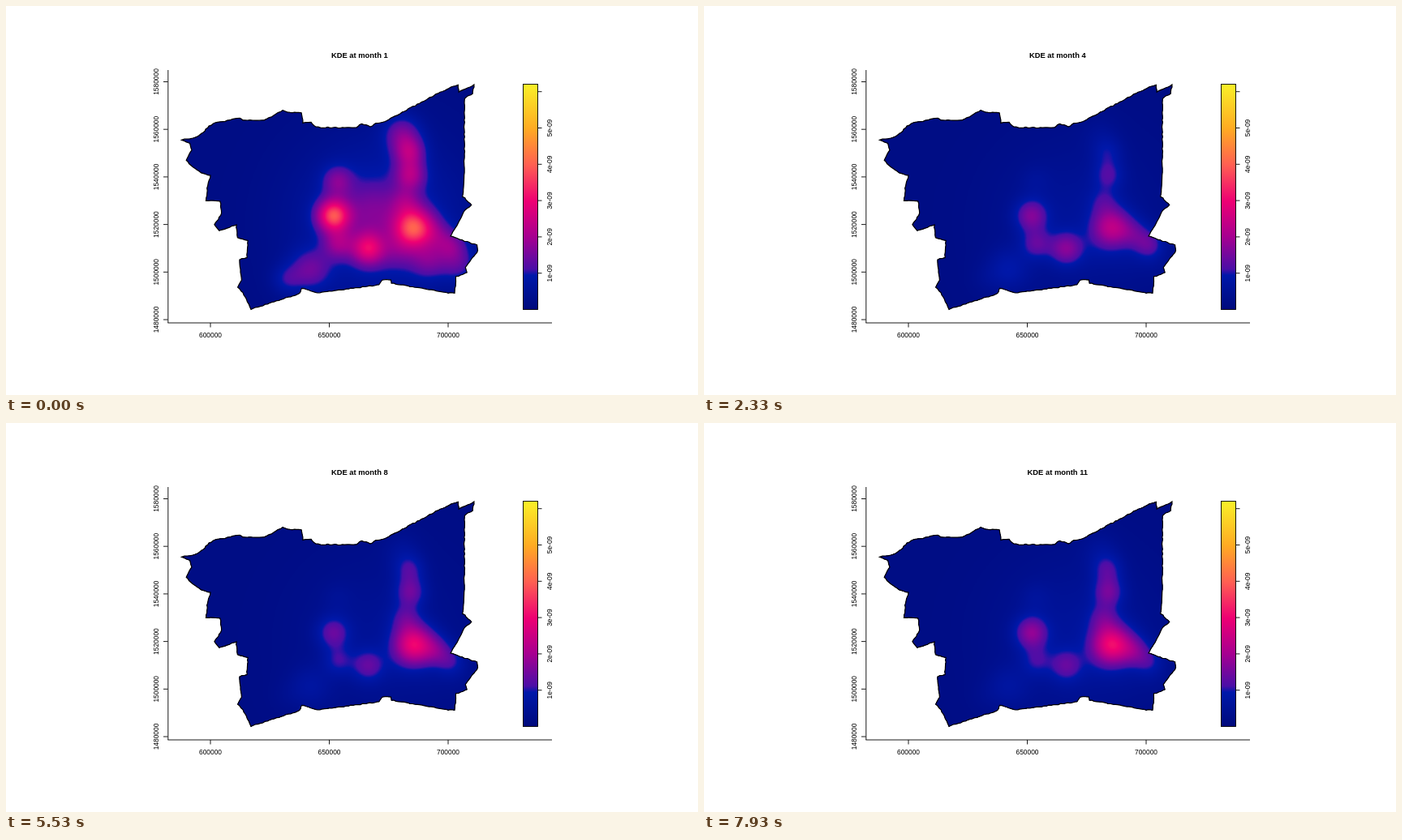
An HTML page with a canvas for the animation above (8 s loop, 853 by 480 pixels).

```html
<!DOCTYPE html>
<html lang="en">
<head>
<meta charset="utf-8">
<title>KDE by month</title>
<style>
html, body { margin: 0; width: 100%; height: 100%; overflow: hidden; background: #fff; }
#heat { position: absolute; left: 215px; top: 95px; }
svg { position: absolute; left: 0; top: 0; }
text { font: 8.4px "Liberation Sans", Arial, sans-serif; text-anchor: middle; fill: #000; }
#title { font-size: 9.4px; font-weight: bold; }
.line { fill: none; stroke: #000; stroke-width: 0.9; }
</style>
</head>
<body>
<canvas id="heat" width="370" height="282"></canvas>
<svg width="853" height="480" viewBox="0 0 853 480">
  <defs><linearGradient id="ramp" x1="0" y1="1" x2="0" y2="0"></linearGradient></defs>
  <path id="border" fill="none" stroke="#000" stroke-width="1.2"/>
  <rect class="line" x="637.5" y="96.5" width="18" height="278" style="fill:url(#ramp)"/>
  <path class="line" id="axes"/>
  <g id="labels"></g>
  <text id="title" x="435.8" y="64"></text>
</svg>
<script>
const $ = id => document.getElementById(id);
const LOOP = 8000, FIRST = 730, STEP = 800;
const X0 = 215, Y0 = 95, W = 370, H = 282;
const TOP = 6.24, FLOOR = 0.18;

// Colour ramp: density and r, g, b
const RAMP = [
  [0, 0, 10, 124], [0.95, 0, 24, 170], [1.12, 75, 14, 167], [2, 165, 0, 145],
  [3, 238, 0, 115], [4, 255, 95, 82], [5, 255, 170, 35], [TOP, 250, 240, 40]
];

// Kernels: x, y, spread, height in month 1, mean height afterwards
const SITES = [
  [460, 265, 70, 0.9, 0.4],
  [403, 258, 14, 3, 1.2],
  [408, 215, 13, 1, 0.2],
  [409, 293, 13, 1.1, 0.7],
  [446, 299, 14, 2, 1],
  [450, 253, 24, 0.6, 0],
  [482, 303, 15, 0.5, 0.1],
  [502, 273, 17, 3, 2.2],
  [492, 240, 13, 0.7, 0.6],
  [498, 208, 13, 1.4, 0.9],
  [497, 180, 13, 1.4, 0.65],
  [488, 157, 16, 1.1, 0.25],
  [530, 280, 13, 0.5, 0.7],
  [548, 294, 13, 0.9, 0.75],
  [520, 313, 16, 0.9, 0.1],
  [557, 317, 16, 0.8, 0.1],
  [374, 325, 18, 1, 0.5],
  [345, 337, 13, 0.6, 0.1]
];

const OUTLINE = `217,165 230,163 236,161 243,156 250,148 258,144 270,142 288,138 292,141 318,141
330,135 341,129 350,131 364,132 366,144 376,143 382,149 388,150 432,150 438,145 449,149 456,145
467,143 477,137 510,120 530,109 557,97 558,106 577,97 575,108 565,114 565,200 563,235
574,246 566,252 548,284 580,295 582,302 566,322 568,329 555,334 553,354 545,354 475,342 474,338
463,338 460,344 384,354 365,348 362,355 302,374 292,354 286,347 290,338 288,313 297,310
298,289 285,286 284,270 263,277 257,270 266,256 264,241 247,240 248,225 252,209 241,206
228,197 222,190 229,178 227,170`;

// Walk the outline in short steps with a slight ragged offset
function raggedPath() {
  const pts = OUTLINE.split(/\s+/).map(p => p.split(",").map(Number));
  let seed = 7;
  const jitter = () => (seed = seed * 16807 % 2147483647) / 2147483647 - 0.5;
  const out = [];
  pts.forEach(([x, y], i) => {
    const [u, v] = pts[(i + 1) % pts.length];
    const n = Math.max(1, Math.round(Math.hypot(u - x, v - y) / 3));
    for (let k = 0; k < n; k++) {
      const f = k / n;
      out.push((x + (u - x) * f + jitter()).toFixed(1) + " " + (y + (v - y) * f + jitter()).toFixed(1));
    }
  });
  return "M" + out.join("L") + "Z";
}

function colour(v) {
  const i = Math.max(1, RAMP.findIndex(s => s[0] >= v));
  const a = RAMP[i - 1], b = RAMP[i], f = (v - a[0]) / (b[0] - a[0]);
  return [1, 2, 3].map(c => Math.round(a[c] + (b[c] - a[c]) * f));
}
const SHADES = Array.from({ length: 625 }, (_, i) => colour(i / 100));

// Yearly swing: the south peaks in spring, the east in autumn, the west in winter
function height([x, y, , first, mean], m) {
  if (m === 1) return first;
  const peak = y > 285 ? 4 : x > 470 ? 9.5 : 1;
  return mean * (1 + 0.2 * Math.cos((m - peak) * Math.PI / 6));
}

function heatMap(m) {
  const sum = new Float32Array(W * H).fill(FLOOR);
  for (const site of SITES) {
    const [x, y, s] = site, h = height(site, m);
    const bell = d => Math.exp(-d * d / (2 * s * s));
    const cols = Array.from({ length: W }, (_, i) => bell(i + X0 - x));
    for (let j = 0, k = 0; j < H; j++) {
      const row = h * bell(j + Y0 - y);
      for (let i = 0; i < W; i++) sum[k++] += row * cols[i];
    }
  }
  const img = new ImageData(W, H);
  sum.forEach((v, k) => {
    img.data.set(SHADES[Math.min(624, Math.round(v * 100))], k * 4);
    img.data[k * 4 + 3] = 255;
  });
  const cv = document.createElement("canvas");
  cv.width = W;
  cv.height = H;
  cv.getContext("2d").putImageData(img, 0, 0);
  return cv;
}

// Fixed parts
const edge = raggedPath();
$("border").setAttribute("d", edge);
$("ramp").innerHTML = RAMP.map(([v, r, g, b]) =>
  `<stop offset="${v / TOP}" stop-color="rgb(${r},${g},${b})"/>`).join("");

let axes = "M199.8 79V391M199.4 391H673", labels = "";
const upright = (x, y, s) => `<text transform="translate(${x} ${y}) rotate(-90)">${s}</text>`;
for (let i = 0; i < 6; i++) {
  const y = 387 - i * 58.7;
  axes += `M194 ${y}h5.5`;
  labels += upright(188, y, 1480000 + i * 20000);
}
for (let i = 0; i < 3; i++) {
  const x = 252 + i * 146.5;
  axes += `M${x} 391v5.5`;
  labels += `<text x="${x}" y="409">${600000 + i * 50000}</text>`;
}
for (let i = 1; i < 7; i++) {
  const y = 374.5 - i * 44.8;
  axes += `M656 ${y}h4.5`;
  if (i < 6) labels += upright(672.8, y, i + "e-09");
}
$("axes").setAttribute("d", axes);
$("labels").innerHTML = labels;

const ctx = $("heat").getContext("2d");
ctx.translate(-X0, -Y0);
ctx.clip(new Path2D(edge));

const maps = {};
let shown = 0;
function draw(t) {
  const m = t < FIRST ? 1 : 2 + Math.floor((t - FIRST) / STEP);
  if (m === shown) return;
  shown = m;
  maps[m] = maps[m] || heatMap(m);
  ctx.drawImage(maps[m], X0, Y0);
  $("title").textContent = "KDE at month " + m;
}

const start = performance.now();
function tick() {
  draw((performance.now() - start) % LOOP);
  requestAnimationFrame(tick);
}
tick();
</script>
</body>
</html>
```
